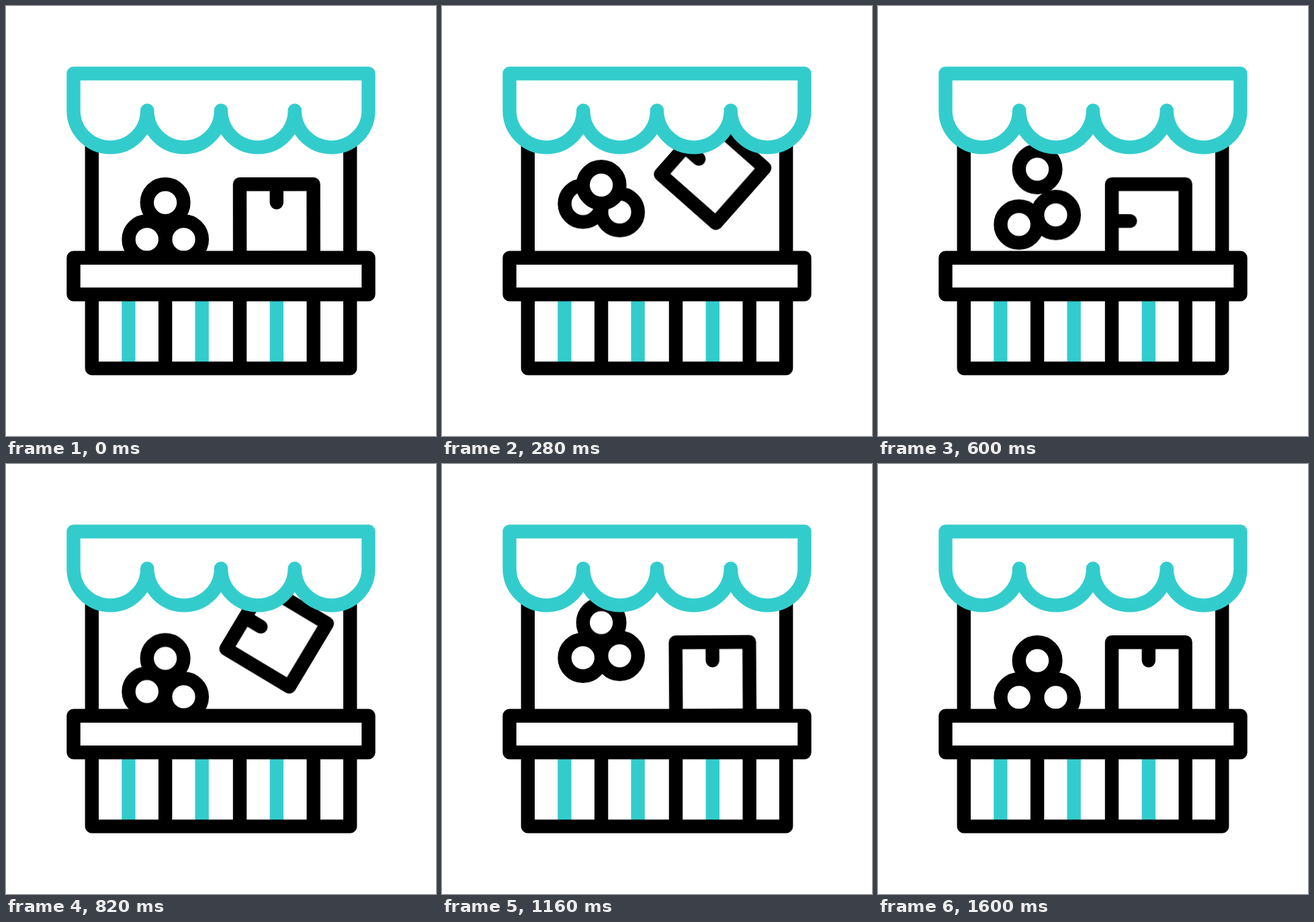
An HTML page for the animation above (2400 ms loop, 640x640 px).

```html
<!DOCTYPE html>
<html lang="en">
<head>
<meta charset="utf-8">
<title>Market stall</title>
<style>
  html, body { margin: 0; width: 100%; height: 100%; overflow: hidden; background: #fff; }
  svg { display: block; width: 100%; height: 100%; }

  .line { fill: none; stroke: #000; stroke-width: 20.4; stroke-linejoin: round; }
  .solid { fill: #fff; }
  .teal { stroke: #33cccc; }
  .round { stroke-linecap: round; }

  .ball, .lift, .turn { animation: 2400ms linear infinite; }

  /* Two hops of 740 ms, then rest; the balls follow each other 60 ms apart. */
  .ball { animation-name: hop; }
  .second { animation-delay: 60ms; }
  .third { animation-delay: 120ms; }
  @keyframes hop {
    0%, 30.833% { transform: translateY(0); animation-timing-function: cubic-bezier(.333, .043, .667, 1); }
    15.417%, 46.25% { transform: translateY(-62px); animation-timing-function: cubic-bezier(.333, 0, .667, .907); }
    61.667%, 100% { transform: translateY(0); }
  }

  /* The box jumps twice, a quarter turn out and a quarter turn back. */
  .lift { animation-name: lift; animation-timing-function: cubic-bezier(.333, 0, .667, 1); }
  @keyframes lift {
    0%, 22.08%, 25.5%, 48.58%, 100% { transform: translateY(0); }
    11.04%, 37.04% { transform: translateY(-75px); }
  }
  .turn {
    transform-origin: 402.8px 320px;
    animation-name: turn;
    animation-timing-function: cubic-bezier(.333, .14, .667, .86);
  }
  @keyframes turn {
    0%, 48.58%, 100% { transform: rotate(0deg); }
    22.08%, 25.5% { transform: rotate(-90deg); }
  }
</style>
</head>
<body>
<svg viewBox="0 0 640 640">
  <!-- posts -->
  <path class="line" d="M127.8 200V375M512.2 200V375"/>

  <!-- fruit -->
  <circle class="line solid ball" cx="209.8" cy="347.4" r="27.3"/>
  <circle class="line solid ball second" cx="264.5" cy="347.4" r="27.3"/>
  <circle class="line solid ball third" cx="237.1" cy="292.6" r="27.3"/>

  <!-- box -->
  <g class="lift">
    <g class="turn">
      <rect class="line solid" x="348" y="265.2" width="109.6" height="109.6"/>
      <path class="line round" d="M402.8 265.2V292.6"/>
    </g>
  </g>

  <!-- awning -->
  <path class="line solid teal" d="M100.5 100.5H539.5V155.5a54.875 54.875 0 0 1-109.75 0a54.875 54.875 0 0 1-109.75 0a54.875 54.875 0 0 1-109.75 0a54.875 54.875 0 0 1-109.75 0Z"/>

  <!-- base and counter -->
  <path class="line teal" d="M182.4 429V539M291.6 429V539M402.8 429V539"/>
  <path class="line" d="M127.8 429V539.4H512.2V429M237.1 429V539M348 429V539M457.7 429V539"/>
  <rect class="line solid" x="100.5" y="374.7" width="439" height="54.6"/>
</svg>
</body>
</html>
```
